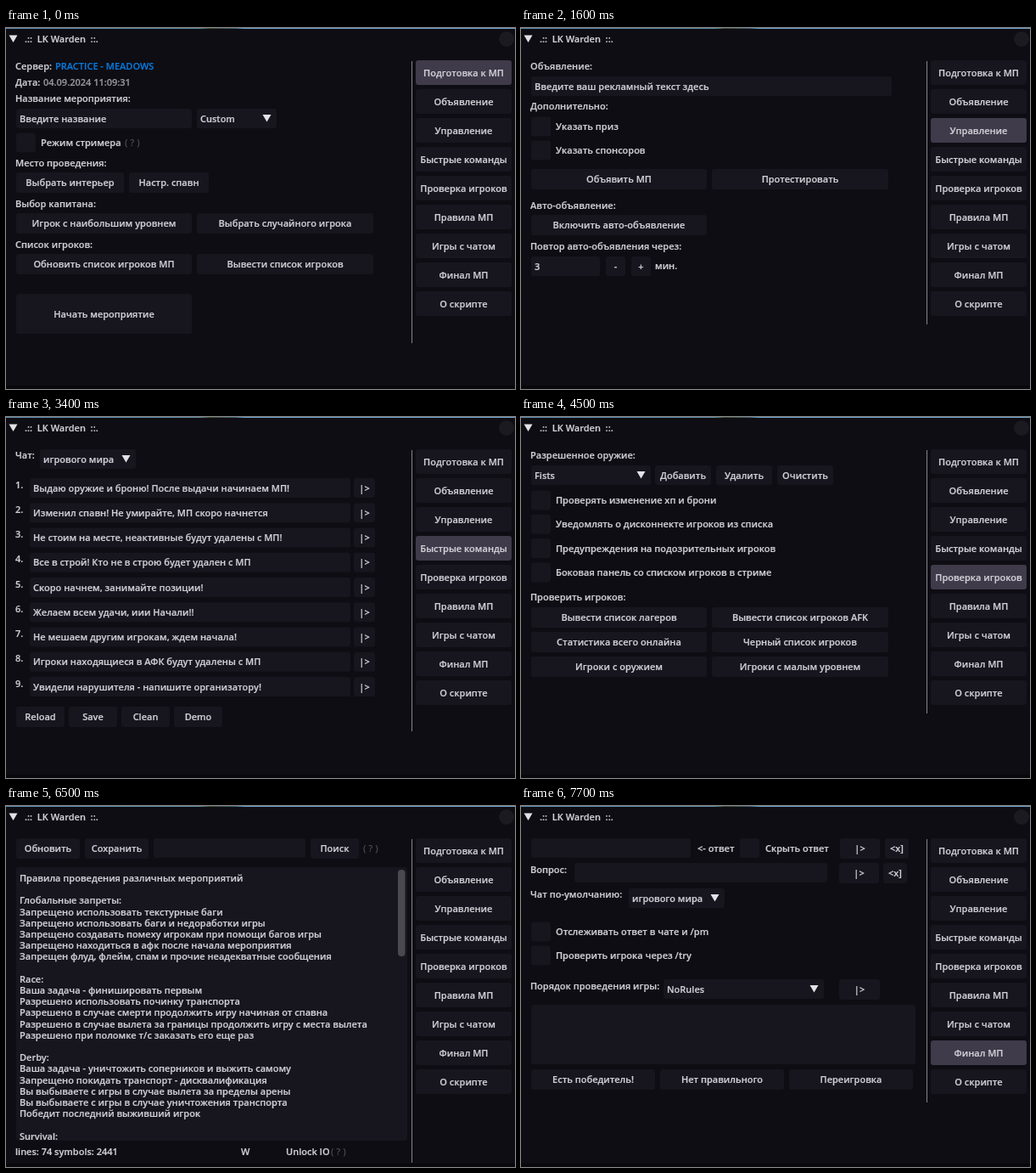
Write an HTML page that moves like this. It is 600 px wide and 425 px high and loops after 8000 ms.

```html
<!DOCTYPE html>
<html lang="ru">
<head>
<meta charset="utf-8">
<style>
  html, body { margin: 0; width: 100%; height: 100%; overflow: hidden; background: #0e0d13; }
  svg { display: block; width: 600px; height: 425px; }
  text {
    font: 600 11px "Open Sans", "Noto Sans", sans-serif; white-space: pre;
    fill: #d0cfd6; stroke: #d0cfd6; stroke-width: .2;
  }
  .box { fill: #17151d; }
  .hint { fill: #4b4a51; stroke: none; }
  .server { fill: #0878dc; stroke: #0878dc; }
  .date { fill: #98979d; stroke: #98979d; }
  .tab.hover rect { fill: #3f3b4a; }
</style>
</head>
<body>
<svg id="stage" viewBox="0 0 600 425"></svg>
<script>
const LOOP = 8000;
const escapeText = s => s.replace(/&/g, '&amp;').replace(/</g, '&lt;');

// Widgets: y is the vertical centre of a label, the top edge of a box.
const label = (x, y, s, attrs = '') => `<text x="${x}" y="${y + 4}" ${attrs}>${escapeText(s)}</text>`;
const box = (x, y, w, h = 23) => `<rect class="box" x="${x}" y="${y}" width="${w}" height="${h}" rx="3"/>`;
const button = (x, y, w, s, h = 24) => box(x, y, w, h) + label(x + w / 2, y + h / 2, s, 'text-anchor="middle"');
const field = (x, y, w, s = '') => box(x, y, w) + label(x + 4, y + 11.5, s);
const arrow = (x, y) => `<path d="M${x - 5} ${y - 4}h10l-5 8.5z" fill="#e2e1e6"/>`;
const combo = (x, y, w, s) => field(x, y, w, s) + arrow(x + w - 11.5, y + 11);
const check = (y, s) => box(12, y - 11.5, 23) + label(41, y, s);
const hint = (x, y) => label(x, y, '( ? )', 'class="hint"');
const divider = bottom => `<path d="M478.5 39V${bottom}" stroke="#85848a"/>`;
const pair = (y, left, right) => button(12, y, 207, left) + button(225, y, 208, right);

const phrases = [
  'Выдаю оружие и броню! После выдачи начинаем МП!',
  'Изменил спавн! Не умирайте, МП скоро начнется',
  'Не стоим на месте, неактивные будут удалены с МП!',
  'Все в строй! Кто не в строю будет удален с МП',
  'Скоро начнем, занимайте позиции!',
  'Желаем всем удачи, иии Начали!!',
  'Не мешаем другим игрокам, ждем начала!',
  'Игроки находящиеся в АФК будут удалены с МП',
  'Увидели нарушителя - напишите организатору!'
];

const rules = `Правила проведения различных мероприятий

Глобальные запреты:
Запрещено использовать текстурные баги
Запрещено использовать баги и недоработки игры
Запрещено создавать помеху игрокам при помощи багов игры
Запрещено находиться в афк после начала мероприятия
Запрещен флуд, флейм, спам и прочие неадекватные сообщения

Race:
Ваша задача - финишировать первым
Разрешено использовать починку транспорта
Разрешено в случае смерти продолжить игру начиная от спавна
Разрешено в случае вылета за границы продолжить игру с места вылета
Разрешено при поломке т/с заказать его еще раз

Derby:
Ваша задача - уничтожить соперников и выжить самому
Запрещено покидать транспорт - дисквалификация
Вы выбываете с игры в случае вылета за пределы арены
Вы выбываете с игры в случае уничтожения транспорта
Победит последний выживший игрок

Survival:`.split('\n');

const pages = [
  [
    label(11, 45, 'Сервер:'), label(58, 45, 'PRACTICE - MEADOWS', 'class="server"'),
    label(11, 64, 'Дата:'), label(44, 64, '', 'id="clock" class="date"'),
    label(11, 83, 'Название мероприятия:'),
    field(12, 95, 207, 'Введите название'), combo(225, 95, 94, 'Custom'),
    check(135, 'Режим стримера'), hint(140, 135),
    label(11, 159, 'Место проведения:'),
    button(12, 170, 127, 'Выбрать интерьер'), button(145, 170, 94, 'Настр. спавн'),
    label(11, 207, 'Выбор капитана:'),
    pair(218, 'Игрок с наибольшим уровнем', 'Выбрать случайного игрока'),
    label(11, 255, 'Список игроков:'),
    pair(266, 'Обновить список игроков МП', 'Вывести список игроков'),
    button(12, 313, 207, 'Начать мероприятие', 47), divider(371)
  ],
  [
    label(11, 45, 'Объявление:'), field(12, 57, 425, 'Введите ваш рекламный текст здесь'),
    label(11, 92, 'Дополнительно:'),
    check(116, 'Указать приз'), check(144, 'Указать спонсоров'),
    pair(166, 'Объявить МП', 'Протестировать'),
    label(11, 209, 'Авто-объявление:'), button(12, 220, 207, 'Включить авто-объявление'),
    label(11, 257, 'Повтор авто-объявления через:'), field(12, 269, 81, '3'),
    button(100, 269, 23, '-', 23), button(130, 269, 23, '+', 23), label(158, 280, 'мин.'), divider(349)
  ],
  [
    label(11, 45, 'Управление игроками:'),
    pair(57, 'Выдать здоровье', 'Выдать броню'),
    pair(86, 'Выдать оружие', 'Забрать оружие'),
    pair(115, 'Заморозить игроков', 'Разморозить игроков'),
    label(11, 158, 'Управление транспортом:'),
    pair(170, 'Выдать транспорт', 'Удалить транспорт'),
    pair(199, 'Починить транспорт', 'Заправить транспорт'),
    label(11, 242, 'Управление миром:'),
    pair(254, 'Изменить погоду', 'Изменить время'),
    pair(283, 'Открыть телепорт', 'Закрыть телепорт'),
    label(11, 326, 'Дополнительно:'),
    pair(338, 'Собрать игроков', 'Завершить МП'), divider(391)
  ],
  [
    label(11, 45, 'Чат:'), combo(40, 38, 113, 'игрового мира'),
    ...phrases.map((phrase, i) => {
      const y = 72 + 29.25 * i;
      return label(11, y + 7.5, `${i + 1}.`) + field(28, y, 378, phrase) + button(410, y, 25, '|>', 23);
    }),
    ...['Reload', 'Save', 'Clean', 'Demo'].map((s, i) => button(12 + 62 * i, 341, 57, s)),
    divider(370)
  ],
  [
    label(11, 45, 'Разрешенное оружие:'), combo(12, 57, 141, 'Fists'),
    ...['Добавить', 'Удалить', 'Очистить'].map((s, i) => button(158 + 72 * i, 57, 66, s, 23)),
    ...['Проверять изменение хп и брони', 'Уведомлять о дисконнекте игроков из списка',
      'Предупреждения на подозрительных игроков', 'Боковая панель со списком игроков в стриме']
      .map((s, i) => check(98 + 28.3 * i, s)),
    label(11, 212, 'Проверить игроков:'),
    pair(224, 'Вывести список лагеров', 'Вывести список игроков AFK'),
    pair(253, 'Статистика всего онлайна', 'Черный список игроков'),
    pair(282, 'Игроки с оружием', 'Игроки с малым уровнем'), divider(349)
  ],
  [
    button(12, 38, 75, 'Обновить'), button(93, 38, 75, 'Сохранить'),
    field(174, 38, 179), button(359, 38, 57, 'Поиск'), hint(421, 50),
    box(12, 72, 461, 322),
    ...rules.map((line, i) => label(16, 85 + 13.2 * i, line)),
    '<rect x="462" y="75" width="8.5" height="102" rx="4" fill="#4a4950"/>',
    label(11, 407, 'lines: 74 symbols: 2441'), label(277, 407, 'W'),
    label(330, 407, 'Unlock IO'), hint(383, 407), divider(420)
  ],
  [
    field(12, 38, 188), label(208, 50, '<- ответ'), box(258, 38, 23), label(288, 50, 'Скрыть ответ'),
    button(376, 38, 47, '|>'), button(429, 38, 28, '<x]'),
    label(11, 75, 'Вопрос:'), field(63, 67, 298),
    button(375, 67, 47, '|>'), button(427, 67, 28, '<x]'),
    label(11, 104, 'Чат по-умолчанию:'), combo(127, 97, 113, 'игрового мира'),
    check(148, 'Отслеживать ответ в чате и /pm'), check(176, 'Проверить игрока через /try'),
    label(11, 212, 'Порядок проведения игры:'), combo(168, 204, 189, 'NoRules'), button(375, 204, 48, '|>'),
    box(12, 234, 453, 70),
    ...['Есть победитель!', 'Нет правильного', 'Переигровка'].map((s, i) => button(12 + 152 * i, 310, 146, s)),
    divider(349)
  ]
];

const tabs = ['Подготовка к МП', 'Объявление', 'Управление', 'Быстрые команды', 'Проверка игроков',
  'Правила МП', 'Игры с чатом', 'Финал МП', 'О скрипте'];

// [start time, visible page, hovered tab]
const timeline = [
  [0, 0, 0], [500, 0, 1], [1100, 1, 1], [1600, 1, 2], [2100, 2, 2], [2600, 2, 3], [3400, 3, 3],
  [3900, 3, 4], [4500, 4, 4], [5000, 4, 5], [5700, 5, 5], [6500, 5, -1], [6700, 5, 6],
  [6900, 6, 6], [7500, 6, 7]
];

const stage = document.getElementById('stage');
stage.innerHTML = `
  <defs><linearGradient id="sky">
    <stop offset="0" stop-color="#5a8cae"/><stop offset=".38" stop-color="#5d8aa4"/>
    <stop offset=".4" stop-color="#454a2c"/><stop offset=".45" stop-color="#3c5d70"/>
    <stop offset=".47" stop-color="#6aa3d0"/><stop offset="1" stop-color="#6aa3d0"/>
  </linearGradient></defs>
  <rect width="600" height="425" fill="#0e0d13"/>
  <rect width="600" height="1" fill="url(#sky)"/>
  <rect y="421" width="600" height="4" fill="#09080c"/>
  ${arrow(8.5, 12.5)}${label(22, 13, '.::  LK Warden  ::.')}
  <circle cx="590" cy="13" r="9" fill="#1b1a21"/>
  ${pages.map(parts => `<g class="page">${parts.join('')}</g>`).join('')}
  ${tabs.map((s, i) => `<g class="tab">${button(483, 38 + 34 * i, 113, s, 29)}</g>`).join('')}`;

const pageNodes = stage.querySelectorAll('.page');
const tabNodes = stage.querySelectorAll('.tab');
const clock = document.getElementById('clock');
const start = performance.now();

function draw() {
  const t = (performance.now() - start) % LOOP;
  const [, page, hover] = timeline.findLast(([from]) => from <= t);
  pageNodes.forEach((node, i) => { node.style.display = i === page ? '' : 'none'; });
  tabNodes.forEach((node, i) => node.classList.toggle('hover', i === hover));
  clock.textContent = `04.09.2024 11:09:${31 + Math.floor((t + 500) / 1000)}`;
  requestAnimationFrame(draw);
}
draw();
</script>
</body>
</html>
```
